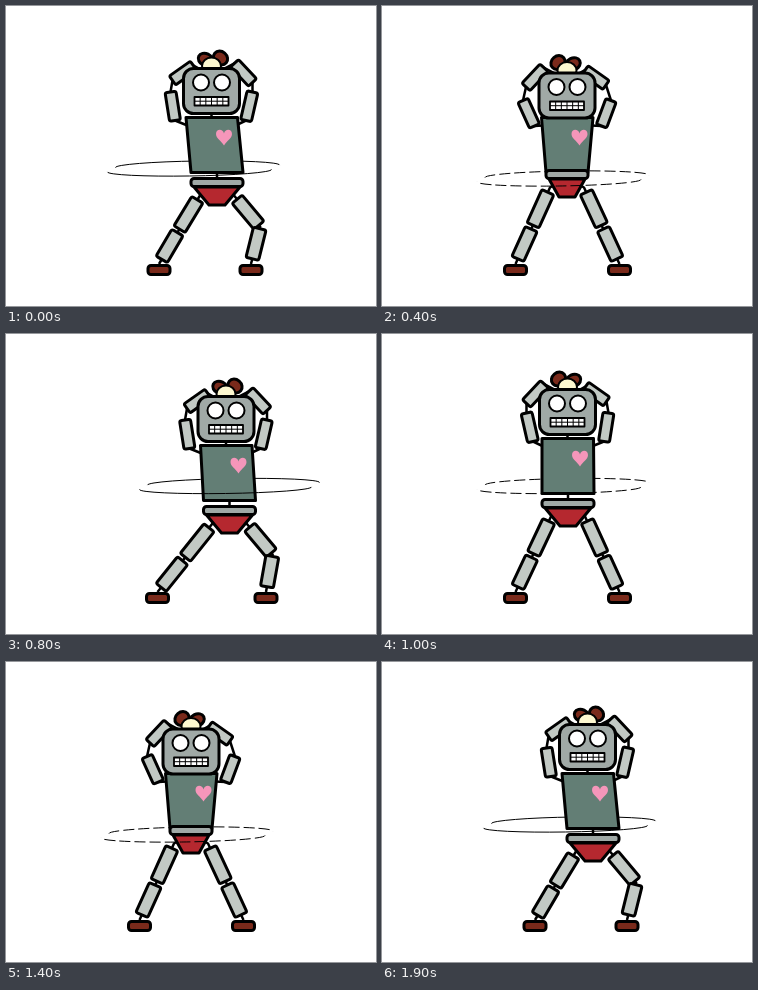
Write an HTML page with a canvas that moves like this. It is 370 by 300 pixels and loops after 2000 ms.

```html
<!DOCTYPE html>
<html lang="en">
<head>
<meta charset="utf-8">
<title>Hula hoop robot</title>
<style>
  html, body { margin: 0; width: 100%; height: 100%; overflow: hidden; background: #fff; }
  canvas { display: block; }
</style>
</head>
<body>
<canvas id="stage" width="370" height="300"></canvas>
<script>
const ctx = document.getElementById('stage').getContext('2d');
const STEP = 100;
const FLOOR = 264;
const COLOR = {
  limb: '#c2c9c4', head: '#a0a9a6', torso: '#637e75', hips: '#b5282f',
  brown: '#7a2a1b', heart: '#f596ba', dome: '#fdf8d0'
};

// Key points of the dance; the rest of the body follows from them.
const half = { head: [205.5, 85], hip: [211, 176.5], feet: [153, 245], hoop: [187.5, 162.5, 86] };
const right = { head: [220, 85], hip: [223.5, 176.5], feet: [151.5, 260], hoop: [223.5, 152, 90] };
const farLeft = { head: [143.5, 89.5], hip: [135, 181.5], feet: [115.5, 220], hoop: [110.5, 158, 86] };
const high = { head: [185.5, 78], hip: [186, 169.5], feet: [133.5, 237.5], hoop: [181, 152, 86], dashed: true };
const low = { ...high, head: [185, 89.5], hip: [185, 168.5], hoop: [181, 172.5, 86] };

const flipX = x => 369 - x;
const flip = ([x, ...rest]) => [flipX(x), ...rest];
const mirror = ({ head, hip, feet, hoop }) => ({
  head: flip(head), hip: flip(hip), hoop: flip(hoop), feet: feet.map(flipX).reverse()
});
const swing = [mirror(half), mirror(right), farLeft, low, half, right, mirror(farLeft), right, half];
const dance = [half, ...swing, high, ...swing];

const mix = (a, b, t) => a.map((v, i) => v + (b[i] - v) * t);

function paint(fill, width = 3) {
  ctx.fillStyle = fill;
  ctx.fill();
  ctx.lineWidth = width;
  ctx.stroke();
}
function box(x, y, w, h, radius, fill, width) {
  ctx.beginPath();
  ctx.roundRect(x, y, w, h, radius);
  paint(fill, width);
}
function oval(x, y, rx, ry, angle, fill, width) {
  ctx.beginPath();
  ctx.ellipse(x, y, rx, ry, angle, 0, Math.PI * 2);
  paint(fill, width);
}
function polygon(points, fill) {
  ctx.beginPath();
  points.forEach(p => ctx.lineTo(...p));
  ctx.closePath();
  paint(fill);
}
function wire(...points) {
  ctx.beginPath();
  points.forEach(p => ctx.lineTo(...p));
  ctx.lineWidth = 2.5;
  ctx.stroke();
}
function bone([x1, y1], [x2, y2], width) {
  ctx.save();
  ctx.translate(x1, y1);
  ctx.rotate(Math.atan2(y2 - y1, x2 - x1));
  box(0, -width / 2, Math.hypot(x2 - x1, y2 - y1), width, 2, COLOR.limb);
  ctx.restore();
}

// Proportions that follow from how far head and hips are apart.
function measure({ head, hip }) {
  const gap = hip[1] - head[1];
  return {
    lean: hip[0] > 190 ? 1 : -1,
    squat: Math.max(0, (91.5 - gap) / 12.5),
    hipWidth: 0.4 * gap - 10.6,
    chest: Math.min(head[1] + 26.5, hip[1] - 57)
  };
}

function drawArms({ head: [hx, hy] }, { lean, squat, chest }) {
  for (const side of [-1, 1]) {
    const at = (x, y) => [hx + side * x, hy + y];
    const tilt = side * lean;
    const hand = at(20.5 + 2.5 * tilt, -26.5 - 1.2 * tilt);
    const upperEnd = at(40 + tilt, -9.5 + tilt);
    const foreStart = at(41 + 3 * squat, 1 + 4 * squat);
    const foreEnd = at(35.5 - tilt - 2 * squat, 29.5 + squat);
    wire(at(8, -20), hand, upperEnd, foreStart, foreEnd, [hx + side * 24, chest + 8]);
    bone(hand, upperEnd, 11);
    bone(foreStart, foreEnd, 11);
  }
  oval(hx - 6 * lean, hy - 31.5, 7.5, 6, 0.45 * lean, COLOR.brown);
  oval(hx + 9 * lean, hy - 33, 7.5, 6.5, 0.7 * lean, COLOR.brown);
  oval(hx, hy - 25, 9.5, 8.5, 0, COLOR.dome, 2);
}

function drawLegs({ hip: [x, y], feet }) {
  feet.forEach((footX, i) => {
    const side = i ? 1 : -1;
    const socket = [x + side * 17, y + 13];
    const ankle = [footX, FLOOR - 6];
    const dx = ankle[0] - socket[0], dy = ankle[1] - socket[1];
    const reach = Math.hypot(dx, dy);
    // A shorter reach pushes the knee further outwards.
    const bend = side * 1.9 * Math.max(0, 80 - reach) / reach;
    const [midX, midY] = mix(socket, ankle, 0.52);
    const knee = [midX + dy * bend, midY - dx * bend];
    wire([x + side * 12, y + 10], socket, knee, ankle);
    bone(mix(socket, knee, 0.12), mix(socket, knee, 0.95), 13);
    bone(mix(knee, ankle, 0.05), mix(knee, ankle, 0.86), 13);
    box(footX - 11, FLOOR - 4.5, 22, 9, 3, COLOR.brown);
  });
}

function drawHeart(x, y) {
  ctx.beginPath();
  ctx.moveTo(x, y + 8);
  for (const side of [-1, 1]) {
    const curve = [[3, 3, 8, 1, 8, -3.5], [8, -9, 1, -9, 0, -4]];
    ctx.moveTo(x, y + 8);
    for (const [a, b, c, d, e, f] of curve) {
      ctx.bezierCurveTo(x + side * a, y + b, x + side * c, y + d, x + side * e, y + f);
    }
    ctx.lineTo(x, y + 8);
  }
  ctx.fillStyle = COLOR.heart;
  ctx.fill();
}

function drawBody({ head: [hx], hip: [x, y] }, { hipWidth: w, chest }) {
  const waist = chest + 55;
  wire([x, waist], [x, y]);
  polygon([[x - w + 3, y + 4.5], [x + w - 3, y + 4.5], [x + 8, y + 22.5], [x - 8, y + 22.5]], COLOR.hips);
  polygon([[hx - 25.5, chest], [hx + 26, chest], [x + w, waist], [x - w, waist]], COLOR.torso);
  box(x - w, y - 4, 2 * w, 8, 3, COLOR.head);
  drawHeart(hx + 12.5, chest + 20);
}

function drawHead({ head: [x, y] }, { chest }) {
  wire([x, y + 20], [x, chest]);
  box(x - 28, y - 22.5, 56, 45, 10, COLOR.head);
  for (const side of [-1, 1]) oval(x + side * 10.5, y - 8.5, 8, 8, 0, '#fff', 2);
  box(x - 17, y + 6, 34, 8.5, 0, '#fff', 1.8);
  ctx.beginPath();
  ctx.moveTo(x - 17, y + 10.2);
  ctx.lineTo(x + 17, y + 10.2);
  for (let i = 1; i < 6; i++) {
    const toothX = x - 17 + i * 34 / 6;
    ctx.moveTo(toothX, y + 6);
    ctx.lineTo(toothX, y + 14.5);
  }
  ctx.lineWidth = 1;
  ctx.stroke();
}

// The back and front halves are slightly offset and leave gaps at the ends.
function drawHoop({ hoop: [x, y, radius], dashed }, side) {
  const start = side < 0 ? Math.PI : 0;
  ctx.beginPath();
  ctx.ellipse(x - 4 * side, y + 2.2 * side, radius - 4, 5.3, -0.015, start, start + Math.PI);
  ctx.setLineDash(dashed ? [11, 4] : []);
  ctx.lineWidth = 1;
  ctx.stroke();
  ctx.setLineDash([]);
}

function frame() {
  const pose = dance[Math.floor(performance.now() / STEP) % dance.length];
  const size = measure(pose);
  ctx.fillStyle = '#fff';
  ctx.fillRect(0, 0, 370, 300);
  ctx.strokeStyle = '#000';
  ctx.lineJoin = 'round';
  drawHoop(pose, -1);
  drawArms(pose, size);
  drawLegs(pose);
  drawBody(pose, size);
  drawHead(pose, size);
  drawHoop(pose, 1);
  requestAnimationFrame(frame);
}
frame();
</script>
</body>
</html>
```
